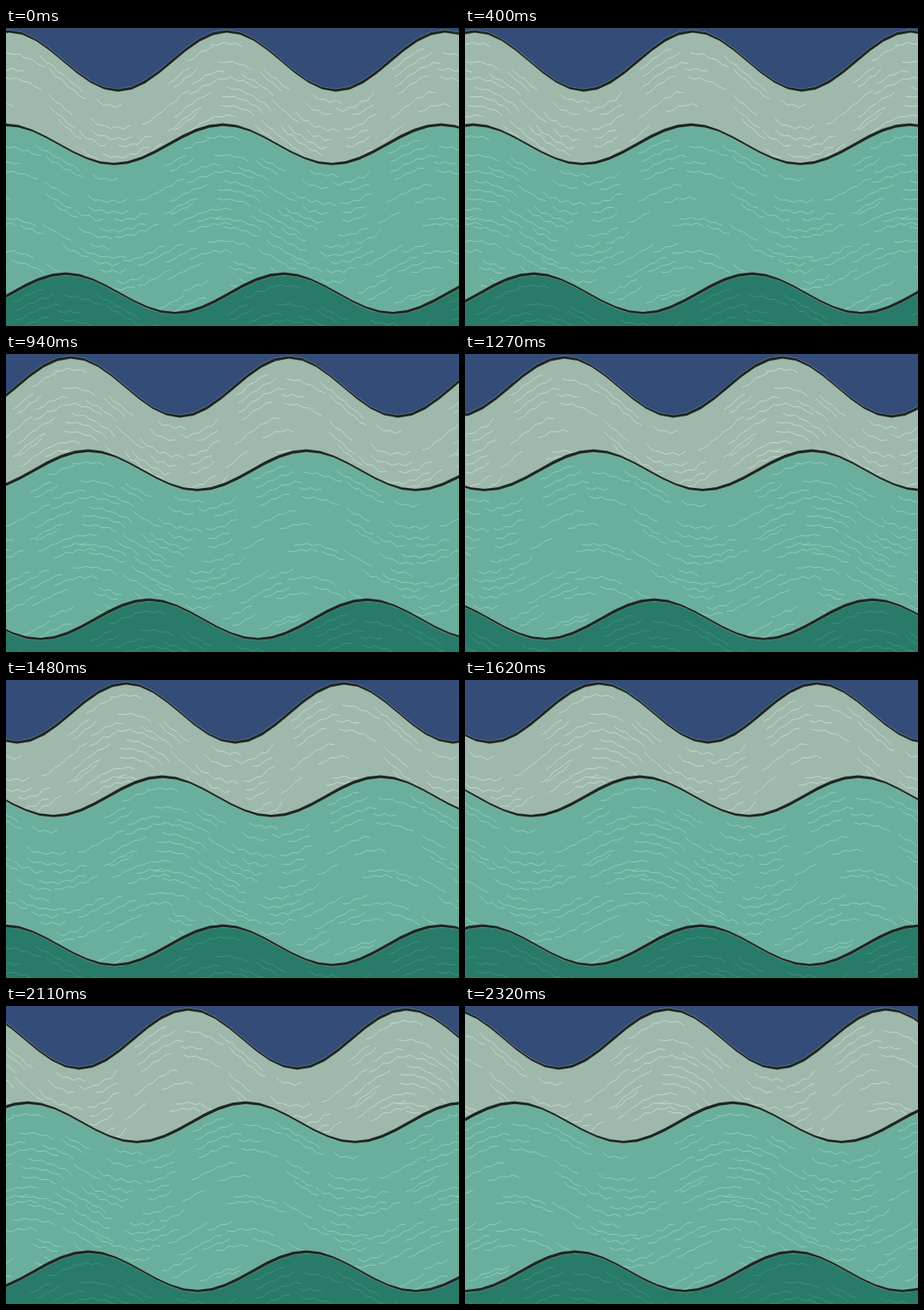
An HTML page for the animation above (2390 ms loop, 545 by 358 pixels).

```html
<!DOCTYPE html>
<html lang="en">
<head>
<meta charset="utf-8">
<title>Waves</title>
<style>
  html, body { margin: 0; width: 100%; height: 100%; overflow: hidden; background: #334d78; }
  svg { display: block; width: 545px; height: 358px; }
</style>
</head>
<body>
<svg id="stage" viewBox="0 0 545 358" fill="none" stroke-linejoin="round" stroke-linecap="round">
  <rect width="545" height="358" fill="#334d78"/>
</svg>
<script>
const stage = document.getElementById('stage');
const WAVE = 262.4, TILE = 2 * WAVE, STEP = WAVE / 16;

const LAYERS = [
  { y: 39.5, amp: 35.5, start: 3.2, speed: 8.3, depth: 125, fill: '#9eb9ab', ink: '#c3d9ca' },
  { y: 139.8, amp: 23.6, start: -1.3, speed: 11.15, depth: 215, fill: '#6aaf9e', ink: '#8bd0ba' },
  { y: 318.8, amp: 23.6, start: 71.8, speed: 11.15, depth: 70, fill: '#287b69', ink: '#3b937f' }
];

// Frame durations in ms; the first pose is held.
const durations = [400, ...[...'7777667776767867' + '7'.repeat(13)].map(d => d * 10)];
const LOOP = durations.reduce((sum, d) => sum + d);

function random(seed) {
  return () => (seed = (seed * 16807) % 2147483647) / 2147483647;
}

function add(parent, name, attrs) {
  const el = document.createElementNS('http://www.w3.org/2000/svg', name);
  for (const key in attrs) el.setAttribute(key, attrs[key]);
  return parent.appendChild(el);
}

const line = points => 'M' + points.map(p => p.map(n => n.toFixed(1)).join(' ')).join('L');
const cosine = (u, length = WAVE) => Math.cos(u / length * 2 * Math.PI);

// Hatching marks: left edge, depth under the crest line and zigzag offsets.
function makeMarks() {
  const rnd = random(4177);
  const marks = [];
  for (let depth = 16; depth < 215; depth += 10.5) {
    let u = rnd() * 40 - 20;
    while (u < TILE - 30) {
      const length = 24 + rnd() * 32;
      const sparse = (u > 200 && u < 300) || (u > 390 && u < 445);
      const trough = cosine(u + length / 2) < -.4;
      if (rnd() < (sparse ? .4 : .85)) {
        const count = Math.round(length / 7.5);
        const jag = trough ? 2 : 1.4;
        const zigzag = Array.from({ length: count + 1 }, (_, i) => (i % 2 ? 1 : -1) * jag * (.3 + rnd() * .9));
        marks.push({ u, depth: depth + rnd() * 6 - 3, length, zigzag });
      }
      u += length + 4 + rnd() * 26;
    }
  }
  return marks;
}

const marks = makeMarks();

function buildLayer(layer) {
  const height = u => layer.y - layer.amp * cosine(u);
  const group = add(stage, 'g', {});
  const crest = [], upper = [], lower = [];
  for (let u = -TILE - STEP; u < TILE + 40; u += STEP) {
    const y = height(u);
    const half = 1.5 + .45 * cosine(u + 60);
    crest.push([u, y]);
    upper.push([u, y - half]);
    lower.unshift([u, y + half]);
  }
  add(group, 'path', { d: line(crest) + `V400H${-TILE - STEP}Z`, fill: layer.fill });

  let hatch = '';
  for (const mark of marks.filter(m => m.depth < layer.depth)) {
    for (const tile of [-TILE, 0, TILE]) {
      hatch += line(mark.zigzag.map((dy, i) => {
        const u = mark.u + tile + mark.length * i / (mark.zigzag.length - 1);
        return [u, height(u) + mark.depth + dy];
      }));
    }
  }
  add(group, 'path', { d: hatch, stroke: layer.ink, 'stroke-width': 1 });

  const ribbon = line([...upper, ...lower]) + 'Z';
  add(group, 'path', { d: ribbon, stroke: '#a3a995', 'stroke-width': 1.2, opacity: .6 });
  add(group, 'path', { d: ribbon, fill: '#1c2725' });
  return group;
}

const groups = LAYERS.map(buildLayer);

function draw(time) {
  let frame = 0, rest = time % LOOP;
  while (rest >= durations[frame]) rest -= durations[frame++];
  LAYERS.forEach((layer, i) => {
    // The two halves of the hatching tile trade places on every step.
    const swap = frame % 2 ? 0 : WAVE;
    const x = (layer.start + layer.speed * frame + swap + TILE) % TILE;
    groups[i].setAttribute('transform', `translate(${x.toFixed(2)} 0)`);
  });
}

const begin = performance.now();
function tick() {
  draw(performance.now() - begin);
  requestAnimationFrame(tick);
}
tick();
</script>
</body>
</html>
```
